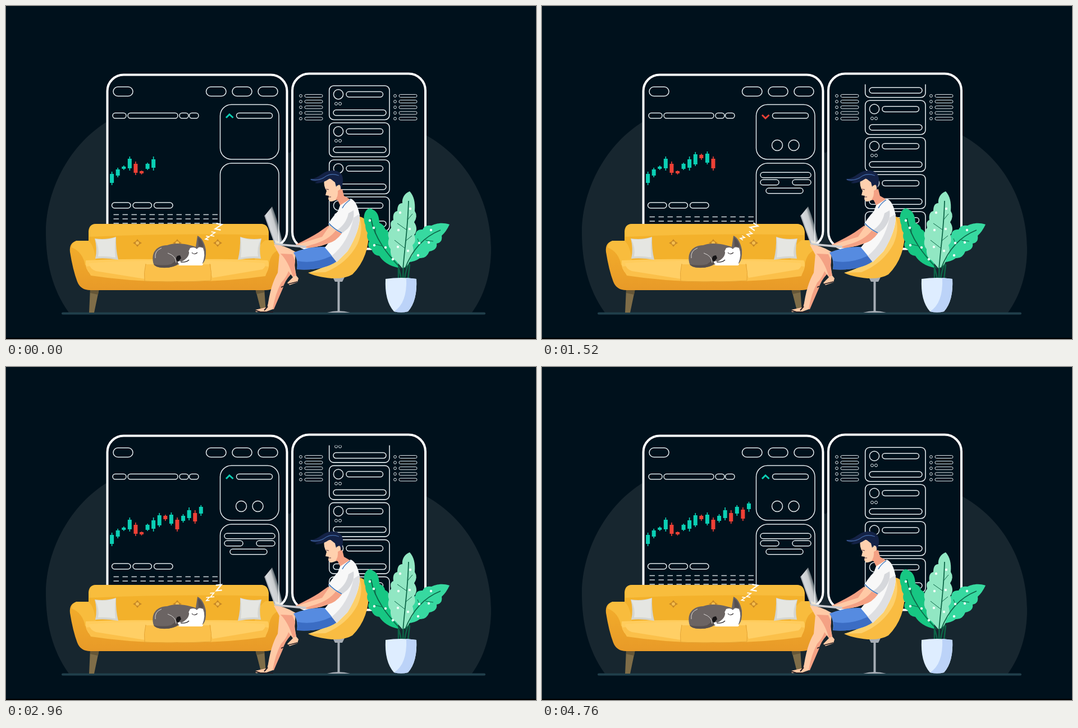
An HTML page with a canvas that plays this animation: 944 px wide and 593 px high, repeating every 4.8 s.

```html
<!DOCTYPE html>
<html lang="en">
<head>
<meta charset="utf-8">
<style>
html, body { margin: 0; width: 944px; height: 593px; overflow: hidden; background: #00111c; }
canvas { display: block; }
</style>
</head>
<body>
<canvas id="stage" width="944" height="593"></canvas>
<script>
const ctx = document.getElementById('stage').getContext('2d');
const LOOP = 4800;
const BG = '#00111c', GREEN = '#0bcfb4', RED = '#ef4136', LINE = '#e4eaed';

const fill = (color, d) => { ctx.fillStyle = color; ctx.fill(new Path2D(d)); };
const stroke = (color, width, d) => {
  ctx.strokeStyle = color;
  ctx.lineWidth = width;
  ctx.stroke(new Path2D(d));
};
const linear = (x0, y0, x1, y1, ...colors) => {
  const g = ctx.createLinearGradient(x0, y0, x1, y1);
  colors.forEach((c, i) => g.addColorStop(i / (colors.length - 1), c));
  return g;
};
function box(x0, y0, x1, y1, r, width = 1.5, color = LINE) {
  ctx.beginPath();
  ctx.roundRect(x0, y0, x1 - x0, y1 - y0, r);
  ctx.strokeStyle = color;
  ctx.lineWidth = width;
  ctx.stroke();
}
const pill = (x0, y0, x1, y1, width) => box(x0, y0, x1, y1, (y1 - y0) / 2, width);
function ring(x, y, r, width = 1.5) {
  ctx.beginPath();
  ctx.arc(x, y, r, 0, 7);
  ctx.strokeStyle = LINE;
  ctx.lineWidth = width;
  ctx.stroke();
}
function dots(color, r, points) {
  ctx.fillStyle = color;
  for (const [x, y] of points) {
    ctx.beginPath();
    ctx.arc(x, y, r, 0, 7);
    ctx.fill();
  }
}

function drawBackdrop() {
  ctx.fillStyle = BG;
  ctx.fillRect(0, 0, 944, 593);
  fill('#17262f', 'M112 546C82 504 71 456 71 402C72 323 116 245 180 206C280 145 420 200 505 262C560 195 665 184 748 230C822 271 864 348 864 432C864 477 852 515 830 546Z');
  for (const [x, y, w, h, r] of [[180.5, 122.5, 320, 307, 29], [510, 120.5, 237, 312, 30]]) {
    ctx.beginPath();
    ctx.roundRect(x, y, w, h, r);
    ctx.fillStyle = BG;
    ctx.fill();
    ctx.strokeStyle = '#fff';
    ctx.lineWidth = 4;
    ctx.stroke();
  }
  for (const [a, b] of [[191, 226], [356.5, 392], [403, 438], [449, 484]]) pill(a, 144, b, 160.5);
  for (const [a, b] of [[190, 214], [217, 306], [309, 325], [326.5, 343]]) pill(a, 190.5, b, 200);
  for (const [a, b] of [[188.5, 222], [226, 259.5], [263.5, 297]]) pill(a, 350, b, 360);
  box(381.5, 175.5, 486, 273, 20);
  box(381.5, 280, 486, 450, 20);
  pill(410.5, 190.5, 474.5, 200);
  for (let i = 0; i < 5; i++) {
    const y = 160 + i * 10.15;
    for (const x of [525, 693]) {
      ring(x, y, 2.4, 1);
      pill(x + 7, y - 2.5, x + 39, y + 2.5, 1);
    }
  }
}

// body top, body bottom, wick top, wick bottom, falling
const candles = [
  [299, 315, 295, 319], [291, 302, 288, 305], [286, 290, 284, 292], [272, 289, 268, 293],
  [281, 297, 277, 301, 1], [294, 298, 293, 300, 1], [281, 290, 279, 292], [273, 288, 268, 293],
  [264, 282, 260, 285], [265, 271, 263, 274, 1], [263, 279, 259, 282], [272, 289, 268, 293, 1],
  [265, 274, 262, 277], [255, 269, 250, 273], [260, 275, 255, 279, 1], [249, 261, 246, 265],
  [254, 270, 250, 274, 1], [243, 253, 240, 258]
];
const candleTimes = [300, 700, 1100, 1450, 1880, 2250, 2600, 2900, 3300, 4000];

function drawChart(t) {
  const count = 8 + candleTimes.filter(s => t >= s).length;
  candles.slice(0, count).forEach(([top, bottom, high, low, falls], i) => {
    const x = 188.6 + i * 10.58;
    ctx.fillStyle = falls ? RED : GREEN;
    ctx.fillRect(x - 3.5, top, 7, bottom - top);
    ctx.fillRect(x - .8, high, 1.6, low - high);
  });
  if (candles[count - 1][4]) stroke(RED, 3, 'M392 194L398 200L404.500 194');
  else stroke(GREEN, 3, 'M392 199L398 193L404.500 199');
}

function popIn(t, start, x, y, draw) {
  const u = Math.min(1, Math.max(0, (t - start) / 240));
  if (!u) return;
  const s = 1 - (1 - u) ** 3;
  ctx.save();
  ctx.globalAlpha = s;
  ctx.translate(x, y);
  ctx.scale(s, s);
  draw();
  ctx.restore();
}
function drawWidgets(t) {
  [419, 448.5].forEach((x, i) => popIn(t, 160 + i * 80, x, 248, () => ring(0, 0, 9.5)));
  [[434, 301, 45], [405.5, 314, 16.5], [462.5, 314, 16.5], [432, 329, 33]].forEach(([x, y, w], i) =>
    popIn(t, 240 + i * 80, x, y, () => pill(-w, -4.7, w, 4.7)));
}

function keyed(t, keys) {
  const i = Math.max(1, keys.findIndex(k => k[0] >= t));
  const [t0, v0] = keys[i - 1], [t1, v1] = keys[i];
  return v0 + (v1 - v0) * (t - t0) / (t1 - t0);
}
function drawDashes(t) {
  const y0 = keyed(t, [[0, 0], [800, 7.7], [1520, 11.4], [1960, 13.9], [2960, 21.1], [3560, 28.1], [4480, 38.5], [LOOP, 38.5]]);
  ctx.save();
  ctx.beginPath();
  ctx.rect(185, 369.5, 195, 30);
  ctx.clip();
  ctx.fillStyle = '#c9d0d4';
  for (let row = 0; row < 9; row++)
    for (let col = 0; col < 12; col++)
      ctx.fillRect(191.5 + col * 16, 370.7 + row * 7.7 - y0, 9.5, 1.6);
  ctx.restore();
}

const glide = (t, start) => 1 - (1 - Math.min(1, Math.max(0, (t - start) / 1000))) ** 3;
function drawFeed(t) {
  const refill = t >= 4200;
  const offset = 98.7 * (glide(t, 1360) + glide(t, 2960));
  const base = 142 + .6 * Math.min(1, t / 1000);
  ctx.save();
  ctx.beginPath();
  ctx.rect(570, 139.5, 120, 279);
  ctx.clip();
  for (let i = 0; i < (refill ? 9 : 6); i++) {
    const y = base + i * 66 - offset;
    box(575.7, y, 683, y + 60.5, 8, 1.6);
    ring(592, y + 15.3, 8.6);
    pill(606, y + 10.5, 671.5, y + 20.2);
    ring(588, y + 32, 2.5, 1);
    ring(595, y + 32, 2.5, 1);
    pill(583, y + 43, 677, y + 53);
  }
  ctx.restore();
}

function drawSofa() {
  fill('#7f6d48', 'M150 503H166L157 546H148ZM444 503H460L463 546H455Z');
  fill('#655637', 'M150 503H166L164 514L150 511ZM444 503H460V510L446 513Z');
  fill('#f3b12b', 'M147 470V401Q148 388 161 388H453Q466 388 468 402V470Z');
  fill('#f8bd3d', 'M148 411V400Q149 388 161 388H453Q466 388 467 400V408Q310 404 148 411Z');
  fill(linear(0, 418, 0, 506, '#f3ae2b', '#e89a28'), 'M148 418H128Q112 420 114 438Q119 470 127 491Q133 506 150 506H462Q479 506 483 493L492 444Q494 419 478 417H462L443 453H159Z');
  fill('#f8bc3d', 'M125 418H147Q157 426 160 453L141 462Q137 438 117 430Q117 421 125 418ZM462 417H478Q491 419 491 433Q472 436 468 461L443 453Q445 429 462 417Z');
  fill('#ffcc5c', 'M142 453Q220 449 304 452Q390 449 466 453Q472 462 462 479Q385 492 304 490Q230 492 151 478Q140 468 142 453Z');
  fill('#fbc04a', 'M142 464Q220 455 304 457Q390 455 468 464L462 481Q385 492 304 490Q230 492 151 480Z');
  fill('#ffcf65', 'M148 458Q220 453 304 454Q390 453 460 458Q464 464 457 469L368 484Q364 478 365 460H249Q246 478 247 486L160 472Q149 468 148 458Z');
  stroke('#e6a534', 1, 'M249 459Q245 475 247 490Q300 493 365 489Q367 475 363 459');
  for (const x of [234, 305, 377]) {
    fill('#c88925', `M${x} 415L${x + 3} 419L${x + 8} 422L${x + 3} 425L${x} 429L${x - 3} 425L${x - 8} 422L${x - 3} 419Z`);
    dots('#f6bf4e', 3, [[x, 422]]);
  }
  for (const [x, s] of [[178, 1], [435, -1]]) {
    ctx.save();
    ctx.translate(x, 432);
    ctx.scale(s, 1);
    fill('#d4d5d0', 'M-20-18Q0-15 18-21Q17 0 22 20Q0 16-19 18Q-15 0-20-18Z');
    fill('#e5e6e2', 'M-19-17Q0-14 17-20Q15 0 17 16Q0 13-14 14Q-11 0-19-17Z');
    ctx.restore();
  }
}

function drawDog() {
  fill('#6b6463', 'M262 456C259 438 268 427 287 426C302 420 324 424 338 429L341 409Q352 414 356 434Q357 451 351 458Q330 464 304 460Q296 467 278 466Q263 465 262 456Z');
  fill('#57504f', 'M263 460Q280 463 294 460L304 452L308 459Q298 467 278 466Q266 465 263 460ZM342 412Q350 417 352 429L343 428Z');
  stroke('#d9d6d4', 1, 'M266 449Q264 436 277 431M288 440Q303 445 303 457');
  fill('#fff', 'M328 431Q336 428 340 433Q343 427 351 431Q356 443 350 458Q335 462 314 461Q305 460 306 455Q317 452 323 444Q325 436 328 431Z');
  fill('#6b6463', 'M311 447L326 437Q327 448 313 455L307 454Z');
  fill('#151315', 'M303 450Q303 444 310 444L312 449L307 455Q303 454 303 450Z');
  stroke('#292427', 1.2, 'M331 439Q335 444 341 439M311 456Q321 457 326 452');
  fill('#fff', 'M306 461Q320 454 349 458Q353 460 349 462H310Z');
}

function drawSleep(t) {
  const sway = Math.sin(t / LOOP * Math.PI * 2);
  for (const [x, y, size, drift] of [[358.5, 413, 2.8, -1.5], [368.3, 406, 3.4, 1.5], [378.5, 393, 5, -1]]) {
    ctx.save();
    ctx.translate(x + drift * sway, y);
    ctx.rotate(.2 + .45 * sway);
    stroke('#fff', size > 4 ? 2.2 : 1.7, `M${-size} ${-size}H${size}L${-size} ${size}H${size}`);
    ctx.restore();
  }
}

function drawMan() {
  // chair
  stroke('#a6adb5', 4, 'M592.500 488V545');
  fill('#a6adb5', 'M582 483H603L599 491H586ZM572 546Q592 540 613 546Z');
  fill('#f9bc42', 'M630 375Q644 378 646 397Q648 447 617 478Q604 486 580 485Q551 482 538 475Q578 466 593 449Q625 417 630 375Z');
  fill('#fdd06c', 'M630 377Q637 399 626 424Q608 458 569 474L539 475Q576 463 592 448Q620 420 630 377Z');
  // far leg
  fill('#f4a184', 'M489 441L515 454L508 477Q496 490 493 503L477 540H464Q474 503 484 481Z');
  fill('#ffcaa6', 'M487 441L508 454Q504 479 490 493Q479 514 475 540L461 545H445L444 541L466 536Q471 497 484 475Z');
  stroke('#221c22', 2, 'M444 542L453 545H476M460 542L466 535');
  // near leg
  fill('#ffcaa6', 'M477 425Q495 425 516 438L514 462L517 480L521 485L519 492L505 497L501 493L511 483Q497 465 489 447Z');
  fill('#f4a184', 'M489 441Q503 455 511 482L517 480Q513 466 515 454L510 442Z');
  stroke('#221c22', 1.5, 'M503 495L519 491M490 501L494 499');
  // shorts
  fill('#568be0', 'M512 439Q543 427 570 429L590 454Q565 472 518 469Q521 452 512 439Z');
  fill('#3b6dc4', 'M518 469Q521 460 519 454Q548 460 580 445L590 454Q565 472 518 469Z');
  // far arm
  fill('#f4a184', 'M574 391L584 407Q566 414 548 422L520 428L516 425Q543 412 557 403Z');
  // neck and face
  fill('#f4a184', 'M588 329L599 326L602 338L614 345L596 357L590 344Z');
  fill('#ffd0ae', 'M567 309L586 307L590 320Q597 315 597 323Q597 328 592 329L594 342Q583 349 577 348L574 344L575 338L569 337L571 329Q565 321 567 309Z');
  fill('#f4a184', 'M591 329L596 326L601 337L592 346L587 345Q592 338 591 329Z');
  stroke('#5b3441', 1, 'M570 326L575 327M575 340H579');
  fill('#142246', 'M541 308C556 308 563 296 574 294Q588 290 597 299Q602 306 599 319L596 327Q597 317 591 318L588 322L586 314Q581 310 577 307Q561 318 550 315Q554 313 556 312Q546 314 541 308Z');
  stroke('#3d629d', 1.3, 'M543 309Q559 312 570 303Q580 297 593 302');
  // shirt
  fill('#f8f8f8', 'M595 355L614 343Q626 348 630 374Q631 400 608 437L589 456Q577 440 568 430L579 416Q582 388 595 355Z');
  fill('#dedfe2', 'M630 370Q631 400 609 436L589 456L580 445Q610 421 619 377Z');
  // near arm
  fill('#ffcaa6', 'M578 389L598 405Q588 419 573 423Q554 431 526 431L516 426L531 421L563 411Z');
  fill('#f4a184', 'M588 399L598 405Q588 419 573 423Q554 431 526 431L545 425Q575 417 588 399Z');
  fill('#f8f8f8', 'M600 357Q584 371 574 388Q583 398 598 405Q616 393 619 369Z');
  fill('#d6d8dc', 'M619 364Q622 381 608 397L598 405L588 400Q606 389 610 369Z');
  stroke('#3f78bd', 1.8, 'M575 387Q584 397 598 404');
  stroke('#3f78bd', 1.5, 'M599 360Q603 352 613 345');
  // laptop
  fill(linear(468, 391, 488, 385, '#d7dade', 'rgba(250,250,250,.8)', 'rgba(255,255,255,0)'), 'M461 373L474 357Q486 386 493 425H479Z');
  stroke('#aeb2b7', 2, 'M461 373L479 423');
  fill('#c8cbd0', 'M477 422L535 427L534 431L492 427L479 425Z');
}

function drawPlant() {
  stroke('#0d6648', 2.5, 'M704 486Q699 455 679 430M707 486Q708 440 717 375M710 486Q714 455 732 435M699 486V465M716 486L719 460');
  fill('#17c783', 'M645 361C635 368 637 383 640 390Q640 399 644 404Q641 413 647 419Q642 429 651 433Q654 444 665 445Q675 461 698 466Q701 447 693 434Q692 419 683 414Q684 401 675 397Q674 390 665 386Q664 367 654 363Q649 359 645 361Z');
  fill('#37d9a0', 'M790 389C776 384 764 388 758 391Q746 389 742 398Q730 397 729 408Q719 407 720 419Q711 424 713 434Q707 442 711 456Q727 457 737 449Q749 450 754 437Q769 434 767 423Q778 421 776 409Q784 402 790 389Z');
  fill('#91e7c3', 'M719 330C709 334 705 343 706 351Q697 351 697 365Q688 367 690 381Q683 383 686 395Q678 403 682 414Q678 425 685 433Q684 448 694 453L706 467Q718 464 720 449Q729 441 724 426Q732 419 727 408Q735 397 727 385Q734 374 728 365Q730 342 719 330Z');
  stroke('#0d6648', 1.8, 'M650 378C656 414 681 444 703 467M717 347C716 394 710 430 707 470M774 399C744 411 723 435 711 467');
  stroke('#0d6648', 1, 'M658 406V395M669 427L657 424M715 381L724 370M714 399L697 387M711 419L723 409M710 431L692 417M737 425L733 414M747 417L761 419');
  dots('#f2fff9', 2.2, [[648, 382], [655, 395], [656, 426], [676, 430], [689, 451], [702, 368], [720, 361], [699, 399], [719, 397], [698, 429], [716, 436], [757, 399], [736, 422], [753, 421], [734, 444]]);
  fill('#deedff', 'M676 486Q704 482 731 486Q733 525 716 544Q704 547 691 544Q674 525 676 486Z');
  fill('#bcd3f8', 'M713 484L731 486Q733 525 716 544Q704 547 691 544Q715 529 713 484Z');
}

function drawFloor() {
  ctx.lineCap = 'round';
  stroke('#203f4b', 4, 'M101 547.500H852');
  ctx.lineCap = 'butt';
  ctx.fillStyle = '#000';
  ctx.fillRect(0, 591, 944, 2);
}

function frame(now) {
  const t = now % LOOP;
  drawBackdrop();
  drawChart(t);
  drawWidgets(t);
  drawDashes(t);
  drawFeed(t);
  drawFloor();
  drawSofa();
  drawDog();
  drawSleep(t);
  drawMan();
  drawPlant();
  requestAnimationFrame(frame);
}
frame(0);
</script>
</body>
</html>
```
